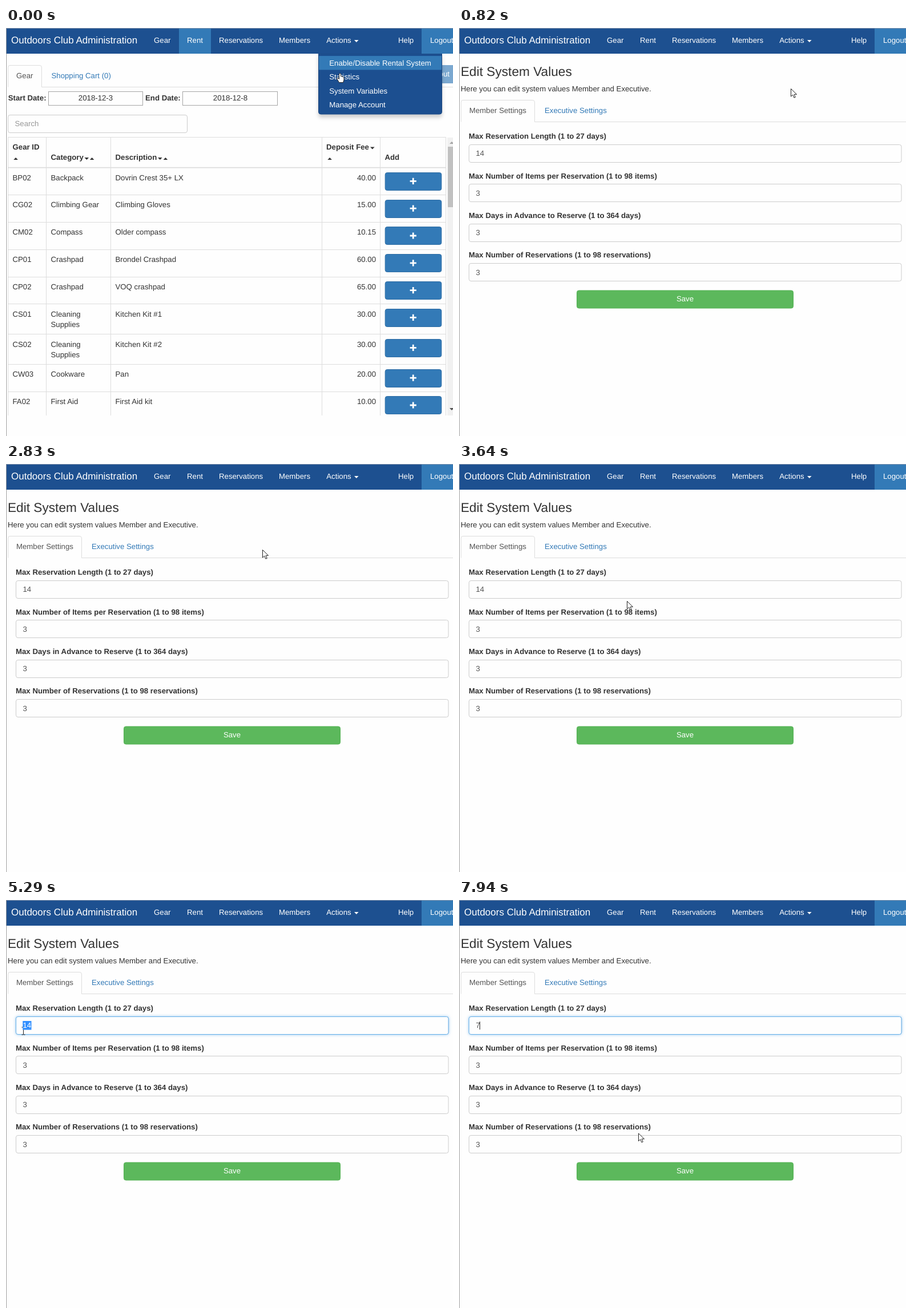
An HTML page for the animation above (8000 ms loop, 783 by 715 pixels).

```html
<!DOCTYPE html>
<html lang="en">
<head>
<meta charset="utf-8">
<title>Outdoors Club Administration</title>
<style>
  html, body { margin: 0; height: 100%; overflow: hidden; background: #fefefe; }
  svg { display: block; width: 783px; height: 715px; }
  text { font: 13.22px "Liberation Sans", Arial, sans-serif; fill: #333; text-rendering: geometricPrecision; white-space: pre; }
  .brand { font-size: 17px; }
  .title { font-size: 22.67px; }
  .bold { font-weight: bold; }
  .white { fill: #fff; }
  .link { fill: #337ab7; }
  .grey { fill: #555; }
  .hint { fill: #999; }
  .mid { text-anchor: middle; }
  .end { text-anchor: end; }
  .line { fill: none; stroke: #ddd; }
  .field { fill: #fefefe; stroke: #ccc; }
  .cursor { fill: #fff; stroke: #222; stroke-linejoin: round; }
</style>
</head>
<body>
<svg id="stage" viewBox="0 0 783 715">
  <defs>
    <filter id="shadow" x="-10%" y="-10%" width="120%" height="130%">
      <feDropShadow dx="0" dy="5.5" stdDeviation="3" flood-opacity=".18"/>
    </filter>
    <filter id="glow" x="-2%" y="-30%" width="104%" height="160%">
      <feDropShadow dx="0" dy="0" stdDeviation="2.4" flood-color="#66afe9" flood-opacity=".7"/>
    </filter>
    <clipPath id="tableClip"><rect y="191" width="783" height="488"/></clipPath>
  </defs>
</svg>
<script>
const LOOP = 8000, BLUE = '#337ab7', NAVY = '#1d5090';
const STEP = 69.4, FIELD_TOP = 204, FIELD_H = 32;

const text = (x, y, s, cls = '') => `<text x="${x}" y="${y}" class="${cls}">${s}</text>`;
const rect = (x, y, w, h, attrs = '') => `<rect x="${x}" y="${y}" width="${w}" height="${h}" ${attrs}/>`;
const path = (d, attrs) => `<path d="${d}" ${attrs}/>`;
const down = (x, y, fill = '#333') => path(`M${x} ${y}h7.6l-3.8 4z`, `fill="${fill}"`);
const up = (x, y, fill = '#333') => path(`M${x} ${y}h7.6l-3.8 -4z`, `fill="${fill}"`);

function tab(y, right, active, nextX, next) {
  return path(`M3.5 ${y + 38.5}V${y + 4}q0 -3.5 3.5 -3.5H${right - 4}q3.5 0 3.5 3.5V${y + 38.5}H783`, 'class="line"')
    + text(18, y + 23, active, 'grey') + text(nextX, y + 23, next, 'link');
}

function navbar() {
  const items = [[259, 'Gear'], [317, 'Rent'], [373, 'Reservations'], [478, 'Members'], [561.3, 'Actions'], [687, 'Help'], [743, 'Logout']];
  return rect(1, 1, 782, 44, `fill="${NAVY}"`)
    + rect(303, 1, 56, 44, `id="rentTab" fill="${BLUE}"`)
    + rect(728, 1, 55, 44, `fill="${BLUE}"`)
    + text(9, 27, 'Outdoors Club Administration', 'brand white')
    + items.map(([x, s]) => text(x, 26, s, 'white')).join('')
    + down(610, 21, '#fff')
    + rect(0, 0, 783, 1, 'fill="#8c9bb0"') + rect(0, 0, 1, 715, 'fill="#a0a0a0"');
}

function gearTable() {
  const rows = [
    ['BP02', 'Backpack', 'Dovrin Crest 35+ LX', '40.00'],
    ['CG02', 'Climbing Gear', 'Climbing Gloves', '15.00'],
    ['CM02', 'Compass', 'Older compass', '10.15'],
    ['CP01', 'Crashpad', 'Brondel Crashpad', '60.00'],
    ['CP02', 'Crashpad', 'VOQ crashpad', '65.00'],
    ['CS01', 'Cleaning|Supplies', 'Kitchen Kit #1', '30.00'],
    ['CS02', 'Cleaning|Supplies', 'Kitchen Kit #2', '30.00'],
    ['CW03', 'Cookware', 'Pan', '20.00'],
    ['FA02', 'First Aid', 'First Aid kit', '10.00']];
  let out = path('M3.5 680V191.5H770.5V680M70.5 191V680M183.5 191V680M553.5 191V680M655.5 191V680', 'class="line"')
    + path('M3 244.7H771', 'class="line" stroke-width="1.8"')
    + text(11.5, 213, 'Gear ID', 'bold') + up(13.3, 231)
    + text(78.5, 231, 'Category', 'bold') + down(137.5, 227) + up(146.8, 231)
    + text(191.5, 231, 'Description', 'bold') + down(266, 227) + up(275.6, 231)
    + text(561, 213, 'Deposit Fee', 'bold') + down(638, 208.5) + up(563.3, 231)
    + text(663.5, 231, 'Add', 'bold');
  let y = 244.8;
  for (const [id, kind, about, fee] of rows) {
    const lines = kind.split('|'), base = y + 21.8;
    out += text(11.5, base, id) + text(191.5, base, about) + text(648, base, fee, 'end')
      + lines.map((s, i) => text(78.5, base + i * 18.6, s)).join('')
      + rect(664.2, Math.round(y + 8) + .5, 98.6, 31, `rx="3.5" fill="${BLUE}" stroke="#2e6da4"`)
      + path(`M707.6 ${y + 23.6}h11.2m-5.6 -5.6v11.2`, 'stroke="#fff" stroke-width="2.8"');
    y += lines.length > 1 ? 52.9 : 47.8;
    out += path(`M3 ${Math.floor(y) + .5}H771`, 'class="line"');
  }
  return `<g clip-path="url(#tableClip)">${out}</g>`;
}

function rentPage() {
  const menu = ['Enable/Disable Rental System', 'Statistics', 'System Variables', 'Manage Account'];
  return tab(65, 63, 'Gear', 79.5, 'Shopping Cart (0)')
    + rect(700, 65, 83, 32, 'fill="#7ba8d0"') + text(777, 85, 'Checkout', 'end white')
    + text(3.7, 127, 'Start Date:', 'bold') + text(244, 127, 'End Date:', 'bold')
    + rect(74.5, 111.5, 165, 24, 'fill="#fefefe" stroke="#a6a6a6"') + text(157, 127, '2018-12-3', 'mid')
    + rect(309.5, 111.5, 166, 24, 'fill="#fefefe" stroke="#a6a6a6"') + text(393, 127, '2018-12-8', 'mid')
    + rect(3.5, 152.5, 314, 31, 'rx="3.5" class="field"') + text(15.5, 172, 'Search', 'hint')
    + gearTable()
    + rect(773, 192, 10, 487, 'fill="#f1f1f1"') + rect(774, 208, 9, 106, 'fill="#c1c1c1"')
    + up(777, 203, '#a3a3a3') + down(777, 666, '#505050')
    + path('M547.5 45H763.5V147q0 4 -4 4H551.5q-4 0 -4 -4Z', `fill="${NAVY}" stroke="#1a4780" filter="url(#shadow)"`)
    + rect(548, 49, 215, 24.3, `id="hover" fill="${BLUE}"`)
    + menu.map((s, i) => text(566.3, 66.3 + i * 24.1, s, 'white')).join('');
}

function settingsPage() {
  const fields = [['Max Reservation Length (1 to 27 days)', ''], ['Max Number of Items per Reservation (1 to 98 items)', 3],
    ['Max Days in Advance to Reserve (1 to 364 days)', 3], ['Max Number of Reservations (1 to 98 reservations)', 3]];
  return text(3, 84, 'Edit System Values', 'title')
    + text(3, 111.3, 'Here you can edit system values Member and Executive.')
    + tab(126, 133, 'Member Settings', 150, 'Executive Settings')
    + fields.map(([label, value], i) => {
      const y = i * STEP;
      return text(17, 194.2 + y, label, 'bold')
        + rect(17.5, Math.round(FIELD_TOP + y) + .5, 757.5, 31, 'rx="3.5" class="field"')
        + text(29.5, 224.4 + y, value, 'grey');
    }).join('')
    + rect(17.5, 204.5, 757.5, 31, 'id="focus" rx="3.5" fill="#fefefe" stroke="#66afe9" filter="url(#glow)"')
    + rect(206.5, 460, 379, 31, 'rx="3.5" fill="#5cb85c" stroke="#52b152"') + text(396, 479.3, 'Save', 'mid white')
    + path('M-3 -6.5h2.2q.8 0 .8 .8q0 -.8 .8 -.8h2.2M0 -6V6M-3 6.5h2.2q.8 0 .8 -.8q0 .8 .8 .8h2.2', 'id="beam" fill="none" stroke="#222"')
    + rect(29.3, 212, 15.2, 15.5, 'id="selection" fill="#3390ff"')
    + '<text id="value" x="29.5" y="224.4"></text>'
    + rect(36, 213, 1, 14, 'id="caret" fill="#222"');
}

const stage = document.getElementById('stage');
stage.innerHTML += rect(0, 0, 783, 715, 'fill="#fefefe"')
  + `<g id="rent">${rentPage()}</g><g id="settings">${settingsPage()}</g>` + navbar()
  + path('M.5 .5V14l3.2 -3l2.2 5.2l2.3 -.9l-2.1 -5h4.4Z', 'id="arrow" class="cursor"')
  + path('M-1.5 1.5Q0 -.7 1.5 1.5V5.5L5.5 6.5Q7 7 7 9V12L5.5 16.5H-1.5L-5 10.5Q-5.5 8 -3.5 8.7L-1.5 10.5Z', 'id="hand" class="cursor"');

const el = {};
stage.querySelectorAll('[id]').forEach(e => el[e.id] = e);
const show = (id, on) => el[id].style.display = on ? '' : 'none';

// Pointer runs: start time, number of 120 ms steps, end point
const RUNS = [[0, 1, 585, 79], [120, 1, 582, 104], [270, 1, 583.5, 107], [820, 1, 581, 106],
  [1810, 3, 536, 117], [2200, 1, 511, 125], [2320, 2, 486, 135], [2590, 3, 449, 150], [2980, 2, 405, 173],
  [3250, 3, 319, 229.5], [3640, 1, 294, 240], [3760, 2, 256, 252], [4030, 1, 240, 254], [4180, 1, 193, 247],
  [4330, 2, 88, 233.5], [4600, 2, 61, 229.5], [4870, 1, 46, 229.5], [5020, 2, 31, 229.5], [5290, 1, 30.5, 229.5],
  [5660, 1, 120, 257.5], [5810, 2, 153.5, 288.5], [7820, 2, 314, 408.5]];

function pointer(t) {
  let px = 585, py = 79;
  for (const [start, n, x, y] of RUNS) {
    if (t < start) break;
    const k = Math.min(1, (Math.floor((t - start) / 120) + 1) / n);
    px += (x - px) * k;
    py += (y - py) * k;
  }
  return [px, py];
}

function draw(t) {
  const rent = t < 820;
  show('rent', rent);
  show('rentTab', rent);
  show('settings', !rent);
  el.hover.setAttribute('y', t < 120 ? 49 : 97.3);

  const selected = t >= 5020 && t < 6860, typed = t >= 6860;
  el.focus.setAttribute('opacity', t < 4870 ? 0 : t < 5020 ? .6 : 1);
  show('selection', selected);
  el.value.textContent = typed ? '7' : '14';
  el.value.setAttribute('class', selected ? 'white' : 'grey');
  show('caret', typed && (t < 7420 || t >= 7940));

  const [x, y] = pointer(t);
  const inField = y >= FIELD_TOP && (y - FIELD_TOP) % STEP < FIELD_H;
  const shape = rent ? 'hand' : inField ? 'beam' : 'arrow';
  for (const id of ['hand', 'beam', 'arrow']) show(id, id === shape);
  el[shape].setAttribute('transform', `translate(${x} ${y})`);
}

const begin = performance.now();
function tick() {
  draw((performance.now() - begin) % LOOP);
  requestAnimationFrame(tick);
}
tick();
</script>
</body>
</html>
```
